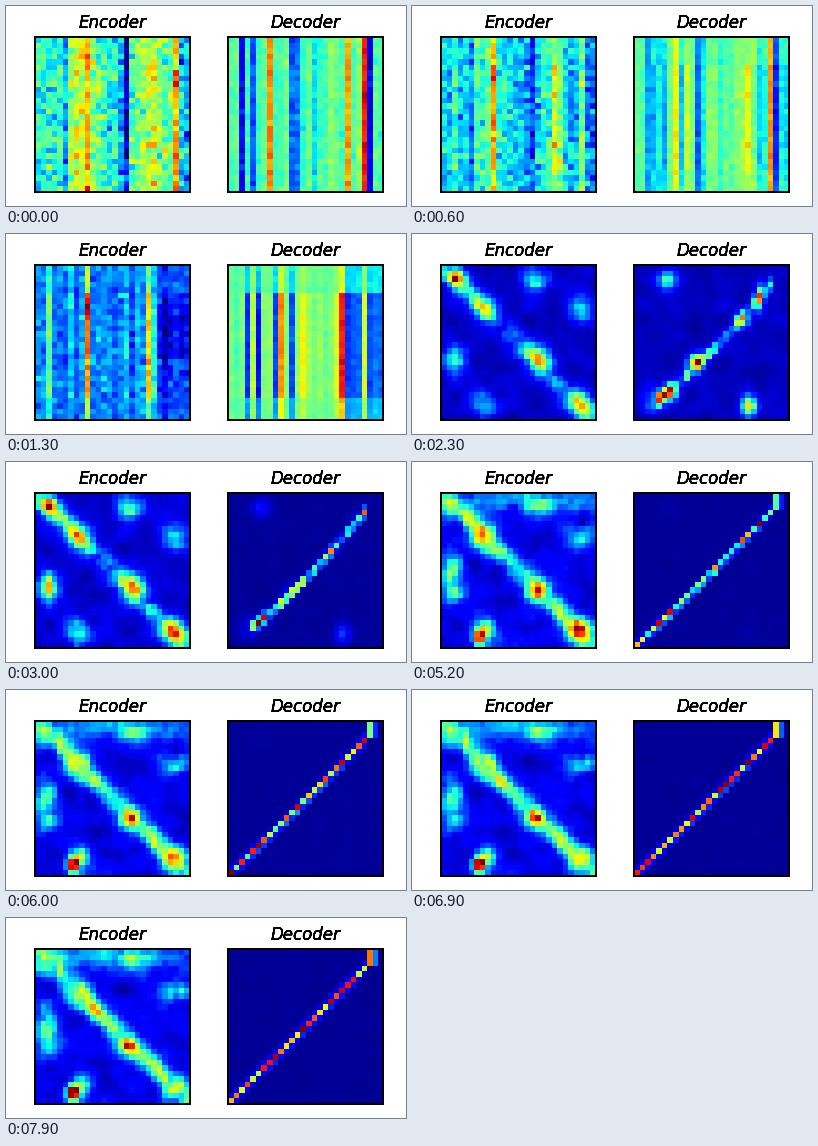
A matplotlib script for the animation above (8000 ms loop, 400x200 px).

```python
import numpy as np
import matplotlib.pyplot as plt
from matplotlib.animation import FuncAnimation

N = 28
FRAMES = 80
SIDE = 155
R, C = np.mgrid[:N, :N].astype(float)
x = np.arange(N)
rng = np.random.default_rng(7)


def ease(t, start, end):
    u = np.clip((t - start) / (end - start), 0, 1)
    return u * u * (3 - 2 * u)


def bell(v, at, width):
    return np.exp(-((v - at) / width) ** 2)


def spot(r, c, tall=1.4, wide=1.3):
    return bell(R, r, tall) * bell(C, c, wide)


def soft_noise():
    """Random field smoothed over neighbouring cells, unit spread."""
    n = rng.normal(size=(N, N))
    for axis in (0, 1):
        n = n + 0.7 * (np.roll(n, 1, axis) + np.roll(n, -1, axis))
    return n / n.std()


class Drift:
    """Noise that turns slowly into other noise."""

    def __init__(self, make, speed):
        self.a, self.b, self.speed = make(), make(), speed

    def __call__(self, t):
        return self.a * np.cos(self.speed * t) + self.b * np.sin(self.speed * t)


def cell_noise():
    return rng.normal(size=(N, N))


def stripes(base, spread, peaks):
    cols = base + rng.normal(0, spread, N)
    for c, level in peaks.items():
        cols[c] = level
    return np.tile(cols, (N, 1))


# Untrained stripes, first and second pattern
enc_first = stripes(0.42 + 0.18 * bell(x, 8, 2.5) + 0.2 * bell(x, 20, 2.8), 0.03,
                    {5: .3, 9: .74, 15: .3, 16: .07, 25: .76, 27: .32})
enc_second = stripes(np.where(x > 21, 0.16, 0.27), 0.05, {2: .48, 9: .77, 20: .68})
enc_second = 0.25 + (enc_second - 0.25) * (1 - 0.4 * ((R < 5) | (R > 23)))
enc_second += 0.16 * spot(8, 9, 2.5, 0.7) - 0.07 * ((C > 21) & (R > 6) & (R < 17))

dec_first = stripes(0.45, 0.05, {2: .12, 4: .21, 7: .77, 11: .22, 12: .24,
                                 21: .73, 24: .88, 25: .11})
dec_second = stripes(np.where(x > 20, 0.2, 0.5 + 0.13 * bell(x, 13.5, 2.5)), 0.05,
                     {3: .17, 5: .14, 8: .18, 9: .76, 11: .2, 20: .88, 24: .61})
dec_second = 0.45 + (dec_second - 0.45) * np.where(R < 5, 0.4, np.where(R > 23, 0.6, 1))

cells = Drift(cell_noise, 0.12)
patches = Drift(soft_noise, 0.05)
phase = rng.uniform(0, 2 * np.pi, N)
speed = rng.uniform(0.05, 0.25, N)

# Two groups of alike positions that attend to each other
group_a = bell(x, 2, 2.2) + bell(x, 16.7, 2.5)
group_b = bell(x, 7.3, 2.2) + bell(x, 24.8, 2.4)
blocks_a = np.outer(group_a, group_a)
blocks_b = np.outer(group_b, group_b)


def encoder_focus(t):
    late = ease(t, 32, 46)
    m = 0.09 + (0.42 - 0.2 * late) * blocks_a + 0.36 * blocks_b
    m += 0.34 * bell(R - C, 0, 2.4) * (1 - 0.6 * late * (C < 4))
    m += late * (0.16 * bell(R, 1, 2) + 0.3 * spot(13.5, 1.5, 3.5, 1.8))
    m *= 1 + 0.2 * patches(t) + 0.07 * cells(t)
    m += 0.4 * bell(t, 24, 9) * spot(1.5, 2.5)
    m += 0.4 * bell(t, 22, 7) * spot(17, 17)
    m += 0.5 * bell(t, 30, 6) * spot(16, 2, 1.8, 0.8)
    m += 0.3 * bell(t, 35, 10) * spot(9.5, 9.8)
    m += (0.5 * ease(t, 34, 44) + 0.3 * ease(t, 44, 60)) * spot(25.6, 6.4, 1.3, 1)
    return m / m.max()


def decoder_focus(t):
    blur = np.exp(-max(t - 20, 0) / 6)
    bow = 1.5 * np.exp(-max(t - 30, 0) / 15)
    row = N - 1 - C + bow * np.sin(np.pi * np.clip(C / 24, 0, 1))
    known = np.where(C < 4, ease(t, 30, 60), 1) * (C < 25)
    low = 0.3 + 0.3 * ease(t, 40, 79)
    level = low + (0.92 - low) * (0.5 + 0.5 * np.sin(phase + speed * t))
    level = level * (0.4 + 0.6 * ease(t, 22, 30)) * known

    m = 0.02 + 0.04 * blur + level * bell(R, row, 0.68 + 0.9 * blur)
    stray = np.exp(-max(t - 20, 0) / 9)
    m += stray * (0.45 * spot(2, 5.5, 1.6, 1.7) + 0.5 * spot(25, 20, 2, 1.4)
                  + 0.25 * spot(24, 3, 2, 2))
    m *= 1 + (0.06 + 0.2 * blur) * patches(t)
    early = bell(t, 20, 7)
    m += early * (0.7 * spot(17, 10.6) + 0.45 * spot(22.7, 6)
                  + 0.35 * spot(9.5, 19) + 0.4 * spot(5.5, 22, 2.4, 0.8))
    m += 0.35 * bell(t, 38, 12) * spot(23, 4, 0.7, 0.7)
    tail = 0.4 * ease(t, 30, 44) + 0.35 * ease(t, 55, 79)
    m += tail * (R < 3) * ((C == 25) + 0.3 * (C == 26))
    return m / m.max()


def attention(first, second, focus, grain):
    def at(t):
        m = first + (second - first) * min(t / 13, 1)
        m = m + (grain - grain / 2 * ease(t, 0, 13)) * cells(t)
        mix = ease(t, 13, 22)
        return np.clip(m + (focus(t) - m) * mix, 0, 1)
    return at


fig = plt.figure(figsize=(4, 2), dpi=100, facecolor="white")


def panel(left, title, values):
    ax = fig.add_axes([left / 400, 14 / 200, SIDE / 400, SIDE / 200])
    ax.set(xticks=[], yticks=[])
    for spine in ax.spines.values():
        spine.set_linewidth(1.44)
    # Stacked copies give the crisp, heavy lettering
    for _ in range(6):
        ax.annotate(title, (0.5, 1), (-0.3, 6.6), xycoords="axes fraction",
                    textcoords="offset points", ha="center", va="baseline",
                    fontsize=12, style="italic", family="DejaVu Sans")
    img = ax.imshow(values(0), cmap="jet", vmin=0, vmax=1,
                    interpolation="nearest", aspect="auto")
    return img, values


panels = [
    panel(29, "Encoder", attention(enc_first, enc_second, encoder_focus, 0.08)),
    panel(222, "Decoder", attention(dec_first, dec_second, decoder_focus, 0.03)),
]


def draw(t):
    for img, values in panels:
        img.set_data(values(t))
    return [img for img, _ in panels]


anim = FuncAnimation(fig, draw, frames=FRAMES, interval=100,
                     repeat=True, repeat_delay=0, blit=False)
plt.show()
```
